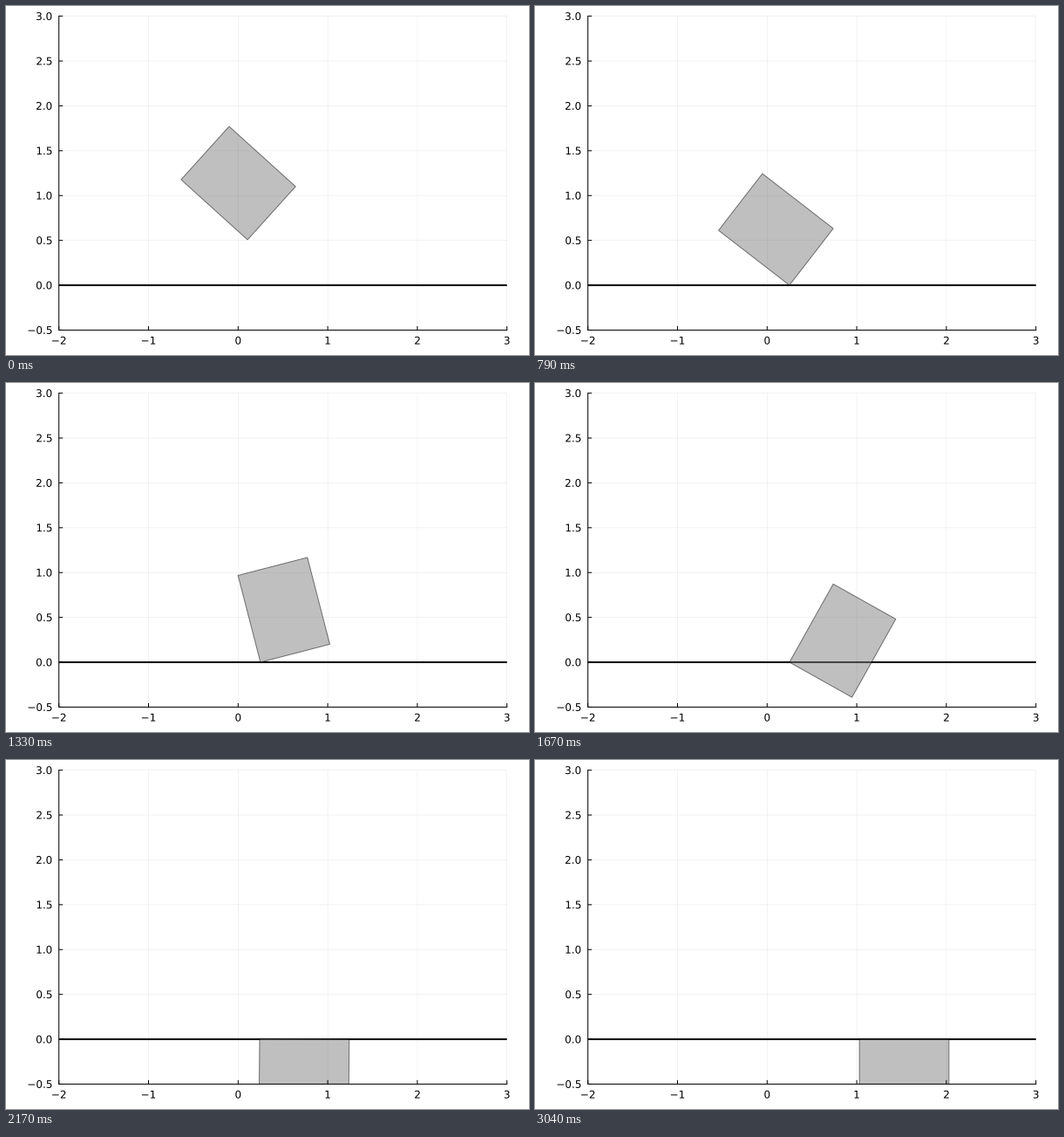
A matplotlib script for the animation above (3.08 s loop, 600 by 400 pixels).

```python
import numpy as np
import matplotlib.pyplot as plt
from matplotlib.animation import FuncAnimation
from matplotlib.patches import PathPatch, Polygon
from matplotlib.textpath import TextPath
from matplotlib.transforms import Affine2D

LOOP, TICK, FPS = 3080, 20, 24      # ms, ms, poses per second
PX = 0.72                           # one pixel in points at 100 dpi
UNIT = 102.8                        # pixels per data unit
LEFT, TOP = 60.7, 11.65             # plot corner in pixels
X0, X1, Y0, Y1 = -2, 3, -0.5, 3
LONG, SHORT = 1.0, 0.8

HIT, LAND, SLIDE = 8, 44, 52        # pose numbers where the motion changes
PIVOT = 0.249
SPEED, RAMP = 0.0467, 8.2

# Turn about the planted corner: (pose, angle of the long side in degrees)
TURN = np.array([
    (19, 142.3), (21, 141.2), (23, 138.5), (26, 131.7), (29, 118.5),
    (32, 104.5), (35, 96), (37, 88), (39, 73.3), (40, 60.75),
    (41, 46.5), (42, 31), (43, 15), (44, 0),
])


def pose(k):
    """Position of the contact corner and angle of the long side."""
    if k < HIT:
        u = k / HIT
        return 0.105 + (PIVOT - 0.105) * u, 0.507 * (1 - u * u), 137.9 + 4.4 * u
    if k <= LAND:
        return PIVOT, 0.0, np.interp(k, *TURN.T)
    if k <= SLIDE:
        u = ((k - LAND) / (SLIDE - LAND)) ** 2
        angle = -0.5 * u
        return PIVOT - 0.009 * u, -np.sin(np.radians(angle)), angle
    s = k - SLIDE
    run = s * s / (2 * RAMP) if s < RAMP else s - RAMP / 2
    angle = -0.5 * max(0, 1 - s / 2)
    return 0.24 + SPEED * run, -np.sin(np.radians(angle)), angle


def corners(x, y, angle):
    a = np.radians(angle)
    p = np.array([x, y])
    along = LONG * np.array([np.cos(a), np.sin(a)])
    across = SHORT * np.array([np.sin(a), -np.cos(a)])
    return np.array([p, p + along, p + along + across, p + across])


plt.rcParams["path.snap"] = False
fig = plt.figure(figsize=(6, 4), dpi=100, facecolor="white")
width, height = (X1 - X0) * UNIT, (Y1 - Y0) * UNIT
ax = fig.add_axes([LEFT / 600, 1 - (TOP + height) / 400,
                   width / 600, height / 400])
ax.set(xlim=(X0, X1), ylim=(Y0, Y1))
ax.axis("off")


def line(xs, ys, width=1.0, alpha=1.0, zorder=4, cap="butt"):
    ax.plot(xs, ys, color="black", alpha=alpha, linewidth=width * PX,
            solid_capstyle=cap, zorder=zorder, clip_on=False)


def label(text, x, y, align):
    """Outline text; x, y in pixels from the bottom left, y on the baseline."""
    path = TextPath((0, 0), text, size=12, prop={"family": "DejaVu Sans"})
    ink = path.get_extents()
    x -= ink.x1 if align == "right" else (ink.x0 + ink.x1) / 2
    fig.add_artist(PathPatch(path, facecolor="black", linewidth=0,
                             transform=Affine2D().translate(x, y)))


def number(v, form):
    return format(v, form).replace("-", "\u2212")


left, bottom = LEFT, 400 - TOP - height
tick = 4.5 / UNIT
for x in range(X0, X1 + 1):
    line([x, x], [Y0, Y1], 0.5, 0.1, zorder=1)
    line([x, x], [Y0, Y0 + tick])
    label(number(x, "d"), left + (x - X0) * UNIT, bottom - 16.2, "center")
for y in np.arange(Y0, Y1 + 0.1, 0.5):
    line([X0, X1], [y, y], 0.5, 0.1, zorder=1)
    line([X0, X0 + tick], [y, y])
    label(number(y, ".1f"), left - 8.3, bottom + (y - Y0) * UNIT - 4.4, "right")
line([X0, X0, X1], [Y1, Y0, Y0], cap="projecting")

line([X0, X1], [0, 0], 2, zorder=2)
box = Polygon(corners(*pose(0)), facecolor=(0.5, 0.5, 0.5, 0.5),
              edgecolor=(0, 0, 0, 0.5), linewidth=PX, zorder=3)
ax.add_patch(box)


def update(i):
    t = i * TICK + TICK / 2
    k = int((t + 4) * FPS / 1000)
    box.set_xy(corners(*pose(k)))
    return [box]


anim = FuncAnimation(fig, update, frames=LOOP // TICK, interval=TICK,
                     repeat=True, repeat_delay=0, blit=False)
plt.show()
```
